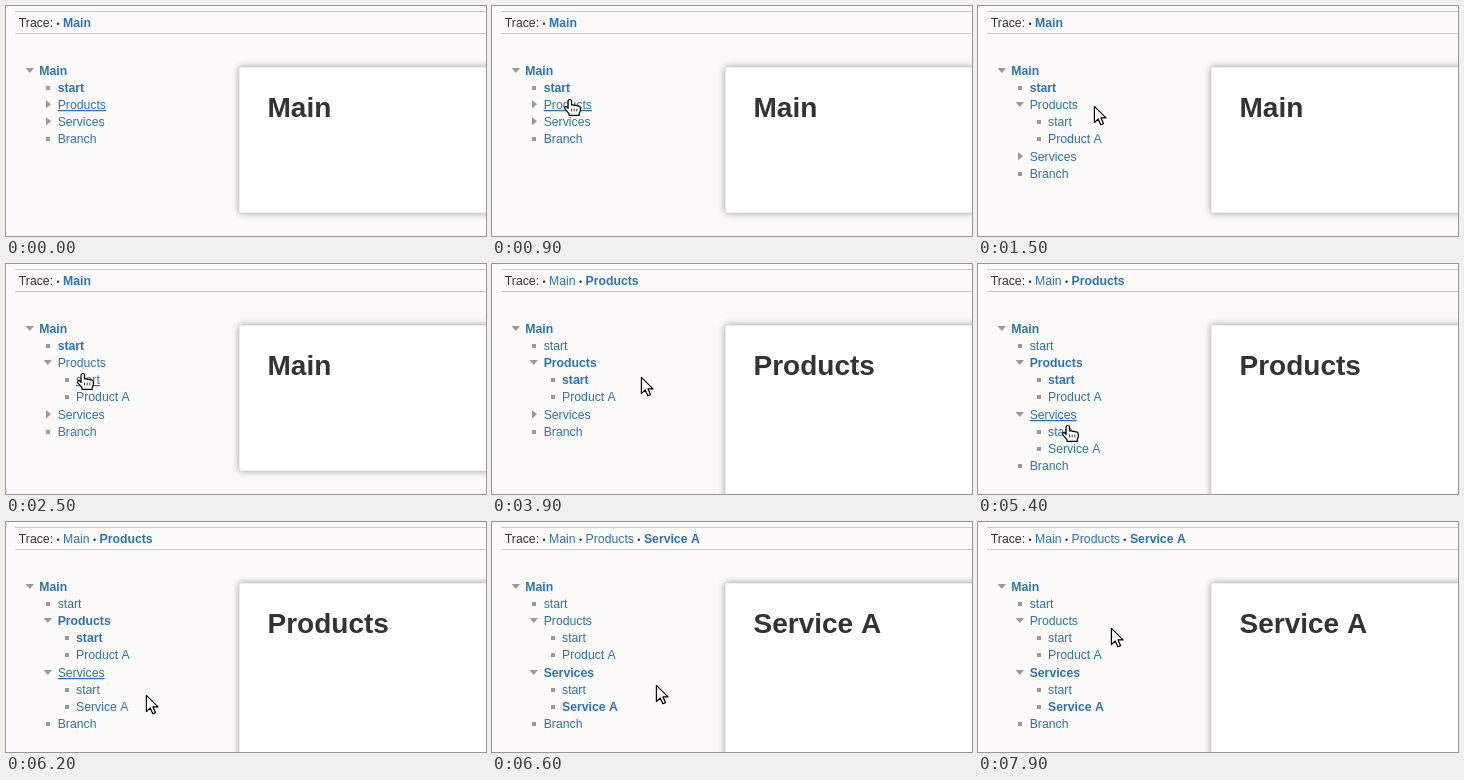
An HTML page that plays this animation: 480 px wide and 230 px high, repeating every 8 s.

```html
<!DOCTYPE html>
<html lang="en">
<head>
<meta charset="utf-8">
<title>Wiki navigation tree</title>
<style>
html, body { margin: 0; width: 100%; height: 100%; overflow: hidden; background: #fbfaf9; }
#stage { position: relative; width: 100%; height: 100%; overflow: hidden; contain: strict; }
#page {
  position: absolute; left: 233px; top: 61px; width: 300px; height: 146px;
  box-sizing: border-box; background: #fff; border: 1px solid #eee;
  border-radius: 2px; box-shadow: 0 0 7px #999;
}
svg { position: absolute; left: 0; top: 0; }
text { font: 12.25px "Liberation Sans", Arial, sans-serif; fill: #333; white-space: pre; }
.link { fill: #2b73b7; font-kerning: none; }
.bold { font-weight: bold; }
.under { text-decoration: underline; text-decoration-thickness: 1px; text-underline-offset: 1px; }
.sep { font-size: 9px; }
#title { font-size: 28px; font-weight: bold; font-kerning: none; }
.mark { fill: #999; }
.cursor { fill: #fff; stroke: #000; stroke-width: 1.2; stroke-linejoin: round; }
</style>
</head>
<body>
<div id="stage">
<div id="page"></div>
<svg width="480" height="230" viewBox="0 0 480 230">
  <path d="M9 5.5H480M9 27.5H480" stroke="#ccc"/>
  <text x="12.8" y="21">Trace:</text>
  <text id="trail" x="50.5" y="21"></text>
  <text id="title" x="261.5" y="111"></text>
  <g id="tree"></g>
  <path id="arrow" class="cursor" d="M.4 .4V16.6L4.2 13L6.8 18.8L9.5 17.6L7 11.9H12Z"/>
  <g id="hand" class="cursor">
    <path d="M-1.9 9.4V2.2A1.7 1.7 0 0 1 1.5 2.2V5.8H3.6L4.4 6.3H6.4L7.2 6.9H8.6Q10.3 7.2 10.3 9V12L9.2 14.4V16.3H-1V14.6L-5.3 9.6Q-5.8 7.5-3.8 7.4Z"/>
    <path d="M1.6 9.6V12.4M4.2 9.6V12.4M6.8 9.6V12.4" fill="none" stroke-width=".8"/>
  </g>
</svg>
</div>
<script>
const LOOP = 8000, STEP = 100, PITCH = 17.15;
const $ = id => document.getElementById(id);

const pages = [
  { from: 0, trail: ["Main"], bold: ["Main", "start"] },
  { from: 3100, trail: ["Main", "Products"], bold: ["Main", "Products", "Products/start"] },
  { from: 6600, trail: ["Main", "Products", "Service A"], bold: ["Main", "Services", "Services/Service A"] }
];

const menu = [
  { name: "start" },
  { name: "Products", opens: 1100, kids: ["start", "Product A"] },
  { name: "Services", opens: 4600, kids: ["start", "Service A"] },
  { name: "Branch" }
];

// Underlined entries: path, start, end
const hovers = [
  ["Products", 0, 1400], ["Products/start", 2100, 2600], ["Products", 2600, 2700],
  ["Services", 4200, 6600], ["Services/Service A", 5700, 6100]
];

// Pointer hotspot: time, x, y, shape from then on
const moves = [
  [300, 22, 77, "arrow"], [600, 56, 88, "hand"], [800, 76, 94, "hand"], [900, 78, 93, "hand"],
  [1300, 78, 93, "hand"], [1400, 104, 97, "arrow"], [1700, 141, 106, "arrow"], [1900, 134, 118, "arrow"],
  [2000, 104, 115, "arrow"], [2100, 78, 109, "hand"], [2400, 78, 109, "hand"], [2500, 77, 109, "hand"],
  [2600, 88, 104, "hand"], [2700, 110, 105, "arrow"], [2900, 150, 113, "arrow"], [3800, 150, 113, "arrow"],
  [3900, 149, 113, "arrow"], [4200, 94, 144, "hand"], [4300, 90, 147, "hand"], [4500, 90, 147, "hand"],
  [4600, 90, 146, "hand"], [4800, 93, 170, "hand"], [5000, 93, 170, "hand"], [5100, 163, 182, "arrow"],
  [5200, 163, 182, "arrow"], [5300, 112, 147, "arrow"], [5400, 90, 161, "hand"], [5500, 89, 172, "hand"],
  [5700, 95, 186, "hand"], [5900, 95, 186, "hand"], [6100, 128, 178, "arrow"], [6400, 164, 163, "arrow"],
  [7700, 164, 163, "arrow"], [7800, 150, 133, "arrow"], [7900, 133, 106, "arrow"]
];

const shapes = {
  open: (x, y) => `M${x - 4.4} ${y - 2.5}h8.4l-4.2 5z`,
  closed: (x, y) => `M${x - 2} ${y - 4.5}v8.4l5-4.2z`,
  leaf: (x, y) => `M${x - 2} ${y - 1.5}h4v4h-4z`
};

function drawTree(t, page) {
  let html = "", row = 0;
  const add = (path, level, kind) => {
    const y = Math.round(68.8 + PITCH * row);
    const x = 33.25 + 18.375 * level;
    const on = hovers.some(([p, a, b]) => p === path && t >= a && t < b);
    const cls = "link" + (page.bold.includes(path) ? " bold" : "") + (on ? " under" : "");
    const d = shapes[kind](Math.round(x - 9.4), y - 4.5);
    html += `<path class="mark" d="${d}"/><text class="${cls}" x="${x}" y="${y}">${path.split("/").pop()}</text>`;
  };
  add("Main", 0, "open");
  row = 1;
  for (const { name, opens, kids } of menu) {
    const isOpen = kids && t >= opens;
    add(name, 1, !kids ? "leaf" : isOpen ? "open" : "closed");
    row++;
    if (!isOpen) continue;
    const room = kids.length * Math.min(1, (t - opens + STEP) / 300);
    const top = row;
    kids.forEach((kid, i) => {
      row = top + i;
      if (i + 1 <= room) add(name + "/" + kid, 2, "leaf");
    });
    row = top + room;
  }
  $("tree").innerHTML = html;
}

function drawPage(page) {
  const last = page.trail.length - 1;
  $("trail").innerHTML = page.trail.map((name, i) =>
    `<tspan class="sep">•</tspan> <tspan class="link${i === last ? " bold" : ""}">${name}</tspan>`).join(" ");
  $("title").textContent = page.trail[last];
  $("page").style.height = page.from ? "300px" : "146px";
}

function drawPointer(t) {
  const i = moves.findLastIndex(m => m[0] <= t);
  const a = moves[i], b = moves[i + 1] || a;
  for (const id of ["arrow", "hand"]) {
    $(id).style.display = a && a[3] === id ? "" : "none";
  }
  if (!a) return;
  const k = b === a ? 0 : (t - a[0]) / (b[0] - a[0]);
  const at = n => Math.round(a[n] + (b[n] - a[n]) * k);
  $(a[3]).setAttribute("transform", `translate(${at(1)} ${at(2)})`);
}

let shown = -1;
function render(now) {
  const t = Math.floor((now % LOOP) / STEP) * STEP;
  if (t !== shown) {
    shown = t;
    const page = pages.findLast(p => t >= p.from);
    drawPage(page);
    drawTree(t, page);
    drawPointer(t);
  }
}

const start = performance.now();
function loop() {
  render(performance.now() - start);
  requestAnimationFrame(loop);
}
loop();
</script>
</body>
</html>
```
